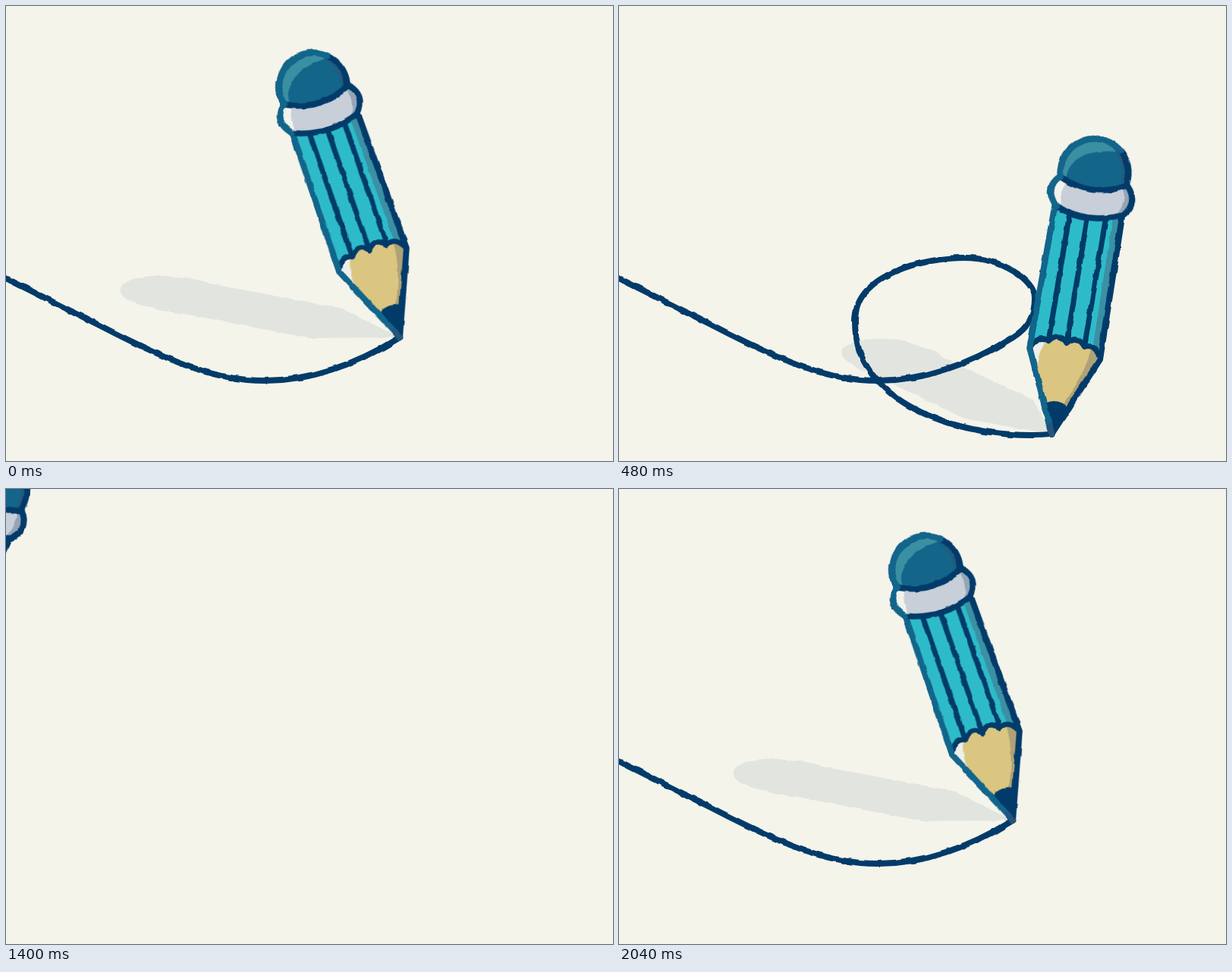
These frames come from a looping animation (800 px wide and 600 px high, 2.08 s). An HTML page:

```html
<!DOCTYPE html>
<html lang="en">
<head>
<meta charset="utf-8">
<title>Pencil loop</title>
<style>
html, body { margin: 0; width: 100%; height: 100%; overflow: hidden; background: #f4f4eb; }
svg { display: block; width: 100%; height: 100%; }
.ink, .lit { fill: none; stroke: #023b69; stroke-width: 8; stroke-linecap: round; stroke-linejoin: round; }
.lit { stroke: #12658b; }
.thin { stroke-width: 7; }
</style>
</head>
<body>
<svg viewBox="0 0 800 600">
  <defs>
    <filter id="rough" filterUnits="userSpaceOnUse" x="-20" y="-20" width="840" height="640" color-interpolation-filters="sRGB">
      <feTurbulence type="fractalNoise" baseFrequency="0.08" seed="4"/>
      <feColorMatrix values="1 0 0 0 0  0 1 0 0 0  0 0 1 0 0  0 0 0 0 1" result="noise"/>
      <feDisplacementMap in="SourceGraphic" in2="noise" scale="4" xChannelSelector="R" yChannelSelector="G"/>
    </filter>
  </defs>
  <rect width="800" height="600" fill="#f4f4eb"/>
  <g id="scene" filter="url(#rough)">
    <path id="shadow" fill="#e2e5df" d="M0,0 L-62,-108 L-60,-290 Q-70,-316 -60,-338 C-58,-418 58,-418 60,-338 Q70,-316 60,-290 L62,-108Z"/>
    <path id="trail" class="ink" d="M-162,320 C-110,310 -50,333 0,359 L125,422
      C225,474 280,494 340,494 S460,474 519,437 C540,424 548,408 548,385 S505,332 455,332
      S311,352 311,415 C311,445 318,464 333,485 C375,541 465,566 545,566
      S725,528 797,477 S930,395 1086,312 L1180,262"/>
    <g id="pencil">
      <path fill="#2ebbc9" d="M-45,-305 L-47,-108 H47 L45,-305Z"/>
      <path fill="#3b90a4" d="M33,-305 L35,-115 L47,-108 L45,-305Z"/>
      <path class="ink thin" d="M-24,-298 V-122 M0,-298 V-122 M24,-298 V-122"/>
      <path fill="#eeefe9" d="M0,0 L-47,-108 Q-38,-128 -24,-121 Q-12,-136 0,-122 Q12,-136 24,-121 Q38,-128 47,-108Z"/>
      <path fill="#dac680" d="M0,0 L-33,-78 Q-36,-104 -27,-121 H-24 Q-12,-136 0,-122 Q12,-136 24,-121 Q38,-128 47,-108Z"/>
      <path fill="#b0a276" d="M34,-122 L47,-108 L15,-36 L9,-42 Q31,-84 33,-120Z"/>
      <path fill="#023b69" d="M-17,-38 Q0,-50 17,-38 L0,0Z"/>
      <path class="ink thin" d="M-47,-108 Q-38,-128 -24,-121 Q-12,-136 0,-122 Q12,-136 24,-121 Q38,-128 47,-108"/>
      <path class="ink" d="M45,-298 L47,-108 L0,0"/>
      <path class="lit" d="M-45,-298 L-47,-108 L0,0"/>
      <path class="lit" style="stroke:#27547a" d="M-4,-10 L0,0"/>
      <g id="head">
        <path fill="#c8cfd9" d="M-45,-338 Q-63,-320 -44,-299 Q0,-281 45,-299 Q63,-318 46,-338 Q0,-316 -45,-338Z"/>
        <path fill="#f3f3ee" d="M-45,-338 Q-63,-320 -44,-299 L-35,-295 Q-46,-312 -34,-333Z"/>
        <path fill="#93a5b6" d="M46,-338 Q63,-318 45,-299 L35,-295 Q47,-312 41,-336Z"/>
        <path fill="#3a8fa3" d="M-43.5,-338 A45,45 0 1 1 43.5,-338 Q0,-316 -43.5,-338Z"/>
        <path fill="#14658a" d="M-36,-335 C-38,-362 -14,-381 30,-381 Q52,-363 43.5,-338 Q0,-316 -36,-335Z"/>
        <path fill="#235a80" d="M30,-382 Q52,-363 43.5,-338 L36,-334 Q42,-359 24,-382Z"/>
        <path class="ink" d="M-45,-338 Q-63,-320 -44,-299 Q0,-281 45,-299 Q63,-318 46,-338"/>
        <path class="ink" d="M-43.5,-338 A45,45 0 1 1 43.5,-338 Q0,-316 -43.5,-338Z"/>
        <path class="lit" d="M-45,-338 Q-63,-320 -44,-299"/>
        <path class="lit" d="M-43.5,-338 A45,45 0 0 1 30,-383"/>
      </g>
    </g>
  </g>
</svg>
<script>
const $ = id => document.getElementById(id);
const trail = $('trail'), total = trail.getTotalLength();
const LOOP = 2080, GRID = 40, STEP = 61.5, STEPS = 33, EXIT = 19, ENTER = 23;

// Distance along the trail of its point nearest to (x, y)
function distTo(x, y) {
  let best = 0, least = Infinity;
  for (let s = 0; s <= total; s++) {
    const p = trail.getPointAtLength(s), gap = Math.hypot(p.x - x, p.y - y);
    if (gap < least) [least, best] = [gap, s];
  }
  return best;
}

// Key poses: step, place of the tip, lean in degrees
const poses = [
  [23, -162, 320, 24.6],
  [29, 232, 473, 13],
  [33, 519, 437, -19.2],
  [38, 333, 485, 24.6],
  [44, 797, 477, -12.5],
  [49, 1086, 312, -18],
  [51, 1180, 262, -18]
].map(([u, x, y, lean]) => ({ u, lean, dist: distTo(x, y) }));

// The tail of the line is wiped away at an even speed
const wipeFrom = distTo(305, 491);
const wipeSpeed = (distTo(452, 553) - wipeFrom) / 5;

// Smooth curve through the key poses
function curve(name, u) {
  const last = poses.length - 1;
  let i = 0;
  while (i < last - 1 && u >= poses[i + 1].u) i++;
  const slope = j => {
    const p = poses[Math.max(j - 1, 0)], q = poses[Math.min(j + 1, last)];
    return (q[name] - p[name]) / (q.u - p.u);
  };
  const a = poses[i], b = poses[i + 1], h = b.u - a.u;
  const x = (u - a.u) / h, y = 1 - x;
  return a[name] * y * y * (1 + 2 * x) + b[name] * x * x * (3 - 2 * x)
       + h * x * y * (slope(i) * y - slope(i + 1) * x);
}

function draw(k) {
  const away = k >= EXIT && k < ENTER;
  $('scene').style.display = away ? 'none' : '';
  if (away) return;
  const u = k < ENTER ? k + STEPS : k;
  const end = curve('dist', u), lean = curve('lean', u);
  const start = Math.max(0, wipeFrom + wipeSpeed * (u - 44));
  const tip = trail.getPointAtLength(end);
  const at = `translate(${tip.x} ${tip.y})`;
  trail.style.strokeDasharray = `0 ${start} ${Math.max(end - start, 0)} ${total * 2}`;
  $('pencil').setAttribute('transform', `${at} rotate(${lean})`);
  $('head').setAttribute('transform', `rotate(${-lean * 0.15} 0 -330)`);
  $('shadow').setAttribute('transform', `${at} matrix(.617 -.246 .755 .271 0 0) rotate(${lean})`);
}

let shown = -1;
const begin = performance.now();
function tick() {
  const ms = (performance.now() - begin) % LOOP;
  const k = Math.round(Math.floor(ms / GRID) * GRID / STEP);
  if (k !== shown) draw(shown = k);
  requestAnimationFrame(tick);
}
tick();
</script>
</body>
</html>
```
